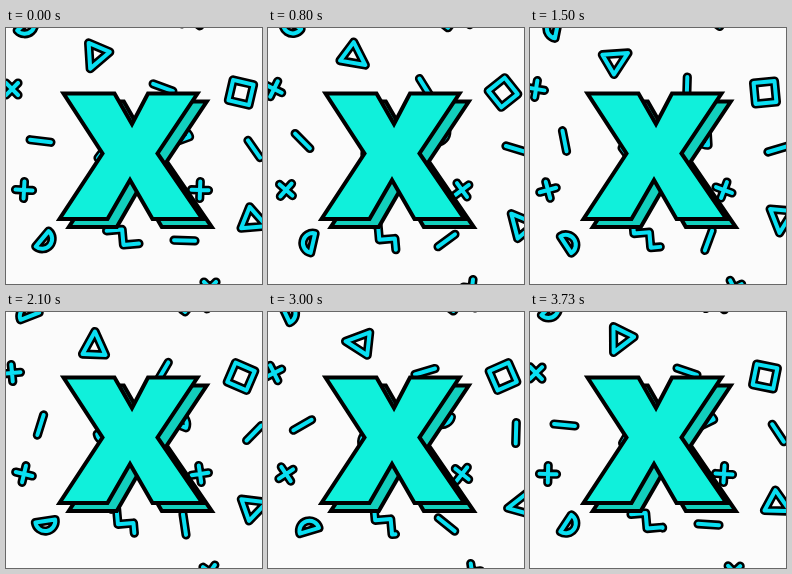
Write an HTML page that moves like this. It is 256 px wide and 256 px high and loops after 3760 ms.

```html
<!DOCTYPE html>
<html lang="en">
<head>
<meta charset="utf-8">
<title>X</title>
<style>
html, body { margin: 0; width: 100%; height: 100%; overflow: hidden; background: #fbfbfb; }
svg { display: block; width: 100vw; height: 100vh; }
.edge, .core { fill: none; stroke-linecap: round; stroke-linejoin: round; }
.edge { stroke: #000; stroke-width: 9.2; }
.core { stroke: #0adff2; stroke-width: 4; }
.letter { stroke: #000; stroke-width: 4; stroke-linejoin: miter; }
</style>
</head>
<body>
<svg viewBox="0 0 256 256">
  <defs>
    <path id="x" d="M57.500 65.500H108.500L126 96L142 65.500H191.500L151.500 125.500L196.500 191H146.500L124 152L101.500 191H53.500L96.500 125.500Z"/>
  </defs>
  <g id="confetti"></g>
  <use href="#x" class="letter" fill="#12cfbd" transform="translate(9.3 8)"/>
  <use href="#x" class="letter" fill="#10f0db"/>
</svg>
<script>
const LOOP = 3760, STEP = 100 / 3, FRAMES = 113;

const forms = {
  line: 'M-10.500 0H10.500',
  plus: 'M-8.500 0H8.500M0 -8.500V8.500',
  square: 'M-10.500 -10.500H10.500V10.500H-10.500Z',
  tri: 'M11 0L-12 11.500V-11.500Z',        // apex points right
  half: 'M-5 -10A10 10 0 0 1 -5 10Z'       // bulge points right
};

// form, centre x, centre y, start angle, degrees per loop
const spinners = [
  ['line', 34.5, 113, 7, 180],
  ['line', 178.5, 212.5, 2, -180],
  ['line', 157, 59.5, 20, 180],
  ['line', 248, 121, 55, -180],
  ['square', 235, 64.5, 13, 180],
  ['plus', 6, 61, 45, -90],
  ['plus', 18, 162, 3, 180],
  ['plus', 194, 162, 2, -180],
  ['plus', 204, 260, 45, -180],
  ['tri', 88.5, 30.5, 113, -360],
  ['tri', 250.5, 194, 22, -720],
  ['half', 40, 214, 40, 720],
  ['half', 22, -0.5, 48, 360],
  ['half', 172.5, 107.5, -110, 720],
  ['half', 102, 125, 37, 720]
];

// centre x, centre y, axis angle, phase at start, waves per loop
const zigzags = [
  [116.8, 209.2, 40, 0, 3],
  [192, -7.5, -8, -0.2, -3]
];

const SVG = 'http://www.w3.org/2000/svg';
const root = document.getElementById('confetti');

function make(tag, parent, cls) {
  const el = document.createElementNS(SVG, tag);
  if (cls) el.setAttribute('class', cls);
  return parent.appendChild(el);
}

function makeShape() {
  const g = make('g', root);
  return { g, paths: [make('path', g, 'edge'), make('path', g, 'core')] };
}

function setPath(shape, d) {
  shape.paths.forEach(p => p.setAttribute('d', d));
}

function place(shape, x, y, angle) {
  shape.g.setAttribute('transform', `translate(${x} ${y}) rotate(${angle})`);
}

// Triangle wave through 0, rising, at p = 0
function tri(p) {
  const f = p - Math.floor(p);
  return f < 0.25 ? 4 * f : f < 0.75 ? 2 - 4 * f : 4 * f - 4;
}

function zigzagPath(phase) {
  const wave = 22, amp = 5.5, end = 16.5;
  const us = [-end];
  for (let k = -8; k <= 8; k++) {
    const u = (((phase % 1) + 0.25) + k / 2) * wave;
    if (u > -end && u < end) us.push(u);
  }
  us.push(end);
  return 'M' + us.map(u => `${u.toFixed(2)} ${(amp * tri(u / wave - phase)).toFixed(2)}`).join('L');
}

const spinShapes = spinners.map(([form]) => {
  const s = makeShape();
  setPath(s, forms[form]);
  return s;
});
const zigShapes = zigzags.map(([x, y, angle]) => {
  const s = makeShape();
  place(s, x, y, angle);
  return s;
});

function draw(ms) {
  const n = Math.min(FRAMES - 1, Math.floor((ms % LOOP + 6.7) / STEP));
  const p = n / FRAMES;
  spinners.forEach(([, x, y, start, turn], i) => place(spinShapes[i], x, y, start + turn * p));
  zigzags.forEach(([, , , start, waves], i) => setPath(zigShapes[i], zigzagPath(start + waves * p)));
}

const begin = performance.now();
function tick() {
  draw(performance.now() - begin);
  requestAnimationFrame(tick);
}
draw(0);
requestAnimationFrame(tick);
</script>
</body>
</html>
```
